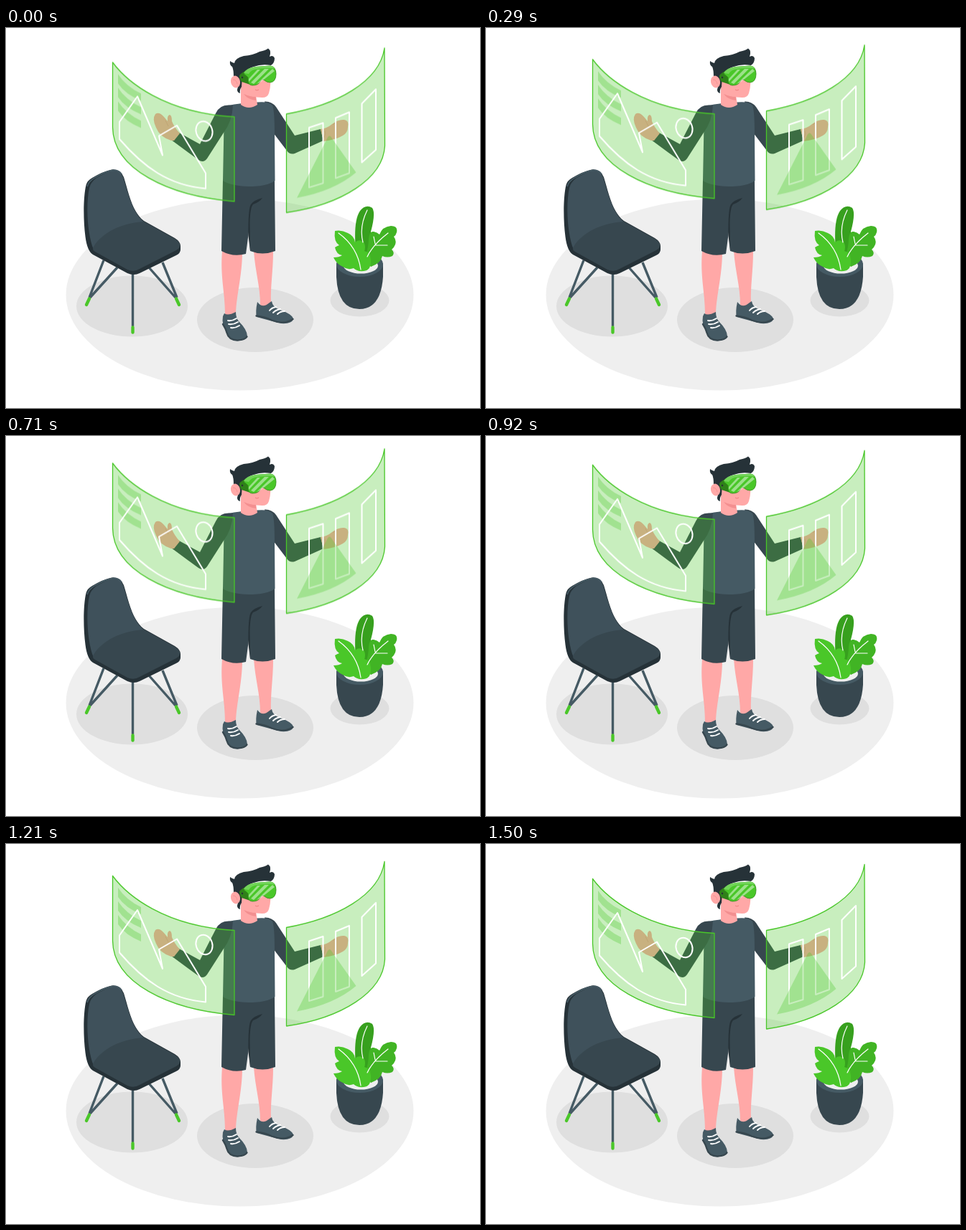
An HTML page for the animation above (1540 ms loop, 660x530 px).

```html
<!DOCTYPE html>
<html lang="en">
<head>
<meta charset="utf-8">
<title>Virtual screens</title>
<style>
html, body { margin: 0; width: 100%; height: 100%; overflow: hidden; background: #fff; }
svg { display: block; width: 660px; height: 530px; }
.floor { fill: #efefef; }
.shadow { fill: #dfdfdf; }
.ink { fill: #263238; }
.dark { fill: #37474f; }
.slate { fill: #455a64; }
.skin { fill: #ffa8a7; }
.green { fill: #4ac729; }
.line { fill: none; stroke: #fff; stroke-linecap: round; stroke-linejoin: round; }
.glass { fill: #49c729; fill-opacity: .3; stroke: #49c729; stroke-width: 1.3; stroke-linejoin: round; }
.tint { fill: #49c729; fill-opacity: .3; }
.float { animation: float 1540ms -6ms infinite; }

/* Triangle wave in 37 equal holds */
@keyframes float {
  0% { transform: translateY(-.59px); animation-timing-function: steps(17); }
  45.946% { transform: translateY(-10.6px); animation-timing-function: step-end; }
  48.649% { transform: translateY(-10.6px); animation-timing-function: steps(18); }
  97.297%, 100% { transform: translateY(0); }
}
</style>
</head>
<body>
<svg viewBox="0 0 660 530">
  <ellipse class="floor" cx="325.5" cy="372" rx="242" ry="133.5"/>
  <g class="shadow">
    <ellipse cx="175.5" cy="388" rx="77.5" ry="42.5"/>
    <ellipse cx="347" cy="407" rx="81" ry="45"/>
    <ellipse cx="492.5" cy="380" rx="41" ry="22.5"/>
  </g>

  <g id="chair">
    <path d="M155 334L117 376M136 324L116 376M199 334L236 376M218 327L238 376M176.5 341V416" fill="none" stroke="#455a64" stroke-width="3.4"/>
    <path d="M116 377.5L112 386M237 377.5L241 386M176.5 417.5V424.5" fill="none" stroke="#4ac729" stroke-width="4.4" stroke-linecap="round"/>
    <path class="ink" d="M111.500 219Q113 213 120 209Q135 200 147 197.500Q159 196 164 208C171 231 176 257 192 269L235 293Q243 298 243 304V309Q243 314 237 317L186 342Q178 346 169 342L121 316Q113 311 110.500 291C107.500 268 107.500 236 111.500 219Z"/>
    <path fill="#3f515b" d="M116 223Q118 215 126 209Q140 201 149 199Q159 198 163 208C171 234 177 260 193 271L160 304L122 309C113 288 111 246 116 223Z"/>
    <path class="dark" d="M122 305C134 285 161 272 192 270L235 294Q243 299 242 304Q242 307 237 310L186 336Q178 341 169 337L124 312Q119 309 122 305Z"/>
    <path d="M113 221Q115 214 123 209Q138 200 149 198.500Q157 198 161 204" fill="none" stroke="#455a64" stroke-width="1.8"/>
  </g>

  <g id="plant">
    <path class="dark" d="M460 328V347Q462 392 492 392Q522 392 525 347V328Z"/>
    <ellipse class="slate" cx="492.5" cy="329.5" rx="32.5" ry="17.5"/>
    <ellipse class="floor" cx="494" cy="331.500" rx="24" ry="11"/>
    <path fill="#37a01e" d="M487 312C485 285 486 265 493 255Q501 245 510 251Q515 258 508 284Q508 310 524 316Q512 328 500 325Z"/>
    <path fill="#41b424" d="M500 322Q505 304 505 294Q506 283 512 284Q517 285 520 288Q524 277 536 276Q546 276 544 285Q543 289 540 291Q544 296 542 302Q540 307 537 309Q542 313 538 318Q531 321 524 318Q522 328 508 333Z"/>
    <path class="green" d="M458 283Q467 281 476 286Q485 290 486 299Q490 295 495 297Q500 299 500 305Q500 309 499 311Q507 312 508 323Q509 338 498 339Q489 340 484 335Q476 338 469 333Q460 329 456 320Q464 320 468 317Q460 316 458 306Q461 304 464 303Q456 298 458 283Z"/>
    <g class="line" stroke-width="1.2">
      <path d="M503 254C496 268 493 283 497 299"/>
      <path d="M463 286C481 299 491 316 494 337"/>
      <path d="M532 286C519 296 509 306 503 319M512 291L514 301M531 303L515 303"/>
    </g>
  </g>

  <g id="person">
    <path class="skin" d="M301 311H329C329 346 321 370 320 399Q312 404 305 399C305 368 298 347 301 311ZM345 311H372C372 340 368 359 369 385Q361 393 354 386C354 360 347 340 345 311Z"/>
    <path class="slate" d="M304 398Q309 402 320 396Q320 404 324 409Q336 421 336 430Q333 437 320 436Q309 435 307 424Q300 413 302 402ZM350 382Q357 392 367 383L370 381Q371 389 381 393Q399 399 400 406Q398 413 383 412Q363 407 349 403Q347 396 350 382Z"/>
    <path d="M302 413Q306 419 307.500 425Q310 435 322 435.500Q333 435 335.500 430.500M348.500 401.500Q361 403 370 407.500Q387 414.500 399.500 406" fill="none" stroke="#37474f" stroke-width="2.400" stroke-linecap="round"/>
    <path class="line" stroke-width="1.9" d="M309 408Q315 409 321 405M310 413Q317 414 323 410M313 418Q319 419 325 415M367 394Q370 390 376 389M372 397Q376 393 382 392M378 399Q382 395 388 395"/>

    <path class="dark" d="M360 102.5Q370 102 376 110L402 150L438 141L442 157L402 175Q395 177 391 171L372 146Z"/>
    <path class="dark" d="M302 211H374L375 311Q357 318 340 311L338 285L334 315Q316 320 300 311Z"/>
    <path class="ink" d="M357 237Q345 240 341 246Q337 252 337.500 290L340 311L339.500 272Q340 250 344 246Q353 243 357 237Z"/>
    <path class="slate" d="M304 109Q319 106 329 105L350 103.500Q366 102 371 108Q374 114 374 150L374.5 213Q363 221 338 221Q313 220 302 213Z"/>
    <path class="dark" d="M316 108Q298 105 292 119L270 162L239 145L230 156L268 184Q275 189 280 182L303 146Q315 130 316 108Z"/>
    <path class="skin" d="M230 157Q214 152 209 139Q203 127 208 120Q213 116 220 124L225 130Q224 122 228 121Q231 122 231 130Q234 138 242 147L234 157Z"/>
    <path class="skin" d="M438 141Q447 140 454 134Q463 127 471 128Q478 129 476 138Q476 146 469 150Q459 156 442 158Z"/>
    <path d="M222 129L226 137M455 135L460 131M443 153Q446 147 444 143" fill="none" stroke="#ed9290" stroke-width=".8"/>

    <path class="skin" d="M327 74V107Q338 115 350 107L348 94Z"/>
    <path fill="#f38f90" d="M331 92Q340 96 348 96V101Q337 100 331 92Z"/>
    <path class="skin" d="M326 60L367 57Q370 79 366 91Q364 97 357 97Q341 97 329 89Z"/>
    <path class="ink" d="M317 68Q317 58 315 54Q311 52 312 46Q314 48 318 49Q319 42 331 39Q344 38 353 33Q362 31 365 28.5Q370 32 367 40Q372 37 374 42Q374 49 369 52Q355 50 345 54Q337 56 334 61L329 66L328 82Q325 86 326 91Q320 90 323 82L324 75Z"/>
    <ellipse class="skin" cx="319.5" cy="75" rx="6.5" ry="8.5" transform="rotate(-12 319.5 75)"/>
    <path d="M316 72Q321 72 322 78" fill="none" stroke="#f38f90" stroke-width=".9"/>
    <path d="M347 86Q349 88 352 86" fill="none" stroke="#ed7e7e" stroke-width="1"/>

    <path fill="#2f8119" d="M325 66Q329 61 338 58L340 79L328 75Q325 72 325 66Z"/>
    <path fill="#4ac729" stroke="#2f8a19" stroke-width=".8" d="M337 60Q341 55 352 54L368 53Q376 54 376 64Q376 75 368 76Q363 76 360 73Q356 70 354 75Q351 80 343 80Q336 80 337 69Q334 66 331 64Z"/>
    <path fill="#72d459" d="M331 63Q334 56 347 54L368 52.5Q373 53 375 57Q370 55 351 57Q341 58 338 64Z"/>
    <path fill="#fff" fill-opacity=".45" d="M341 76L360 57H366L345 78ZM349 78L371 57L374 60L354 76ZM338 71L350 58H354L338 75Z"/>
    <circle class="ink" cx="329" cy="69" r="1.2"/>
  </g>

  <g class="float">
    <path class="glass" d="M148.5 48.5C168 75 220 119 318 124.5V242.5C225 235 149 197 148.5 139Z"/>
    <g class="tint">
      <path id="tab" d="M156 65Q167 82 188 92V102Q166 93 156 78Z"/>
      <use href="#tab" y="19"/>
      <use href="#tab" y="38"/>
    </g>
    <g class="line" stroke-width="2">
      <path d="M158 131.5L183 96L218 178L213 151L238 136.5L278 203V224.5C226 220 191 194 158 155.5Z"/>
      <ellipse cx="276" cy="144.5" rx="11.3" ry="14" transform="rotate(-18 276 144.5)"/>
    </g>

    <path class="glass" d="M390.5 120.5C460 108 520 76 527 28.5L527.5 165C525 211 467 247 390.5 258Z"/>
    <g class="line" stroke-width="2">
      <path d="M422 139.5L441.5 133V217L422 223Z"/>
      <path d="M459 126L478 118V203L459 210Z"/>
      <path d="M495.5 106L515 86V170.5L495.5 188Z"/>
    </g>
    <path class="tint" d="M446 157Q450 146 455 156L487.5 202Q457 228 405 237.5Z"/>
  </g>
</svg>
</body>
</html>
```
